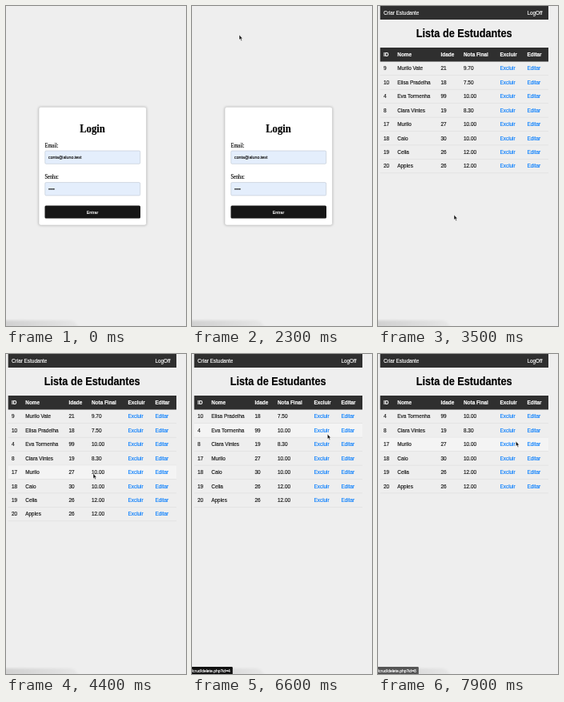
Write an HTML page that moves like this. It is 225 px wide and 400 px high and loops after 8 s.

```html
<!DOCTYPE html>
<html lang="pt-BR">
<head>
<meta charset="utf-8">
<style>
  html, body { margin: 0; width: 100%; height: 100%; overflow: hidden; background: #eee; }
  svg { display: block; width: 100%; height: 100%; }
  text {
    --ink: #111;
    font-family: "Liberation Sans", Arial, sans-serif; font-size: 6.4px;
    fill: var(--ink); stroke: var(--ink); stroke-width: .14;
  }
  .serif { font-family: "Liberation Serif", "Times New Roman", serif; }
  .bold { font-weight: bold; }
  .mid { text-anchor: middle; }
  .h1 { font-size: 12.7px; --ink: #000; }
  .small { font-size: 5.33px; }
  .tiny { font-size: 5px; }
  .white { --ink: #fff; }
  .link { --ink: #007bff; }
</style>
</head>
<body>
<svg viewBox="0 0 225 400" preserveAspectRatio="none">
  <defs>
    <filter id="soft" x="-10%" y="-10%" width="120%" height="120%"><feGaussianBlur stdDeviation="1.5"/></filter>
    <linearGradient id="fade">
      <stop offset="0" stop-color="#cfcfcf"/><stop offset="1" stop-color="#e6e6e6"/>
    </linearGradient>
  </defs>
  <rect width="225" height="400" fill="#eee"/>
  <path d="M-6 393H80Q90 394 91 406H-6Z" fill="url(#fade)" filter="url(#soft)"/>
  <g id="login"></g>
  <g id="list"></g>
  <g id="status"></g>
  <path id="arrow" d="M0 0V6.3L1.4 5.1L2.4 7.5L3.5 7L2.5 4.8H4.3Z" fill="#111" stroke="#fff" stroke-width=".5"/>
  <path id="hand" d="M-.7 .3Q0-.6 .7 .3V2.8L3.6 3.4Q4.2 3.7 4 4.8L3.4 7.4H-.3L-2.3 4.6Q-2.2 3.6-.7 4.6Z" fill="#fff" stroke="#111" stroke-width=".6"/>
</svg>
<script>
const LOOP = 8000, STEP = 100;
const SIGNED_IN = 3500, STATUS_ON = 5700, DELETES = [6500, 7800];
const ROW_TOP = 69.5, ROW_H = 17.45;
const COLS = [7, 24.3, 78.5, 107, 152.5, 186.5];
const $ = id => document.getElementById(id);

// Page content is slightly taller than wide
const text = (x, y, s, cls = '') =>
  `<text class="${cls}" transform="translate(${x} ${y}) scale(1 1.12)">${s}</text>`;
const rect = (x, y, w, h, fill, extra = '') =>
  `<rect x="${x}" y="${y}" width="${w}" height="${h}" fill="${fill}" ${extra}/>`;
const bar = (y, h, fill) => rect(2.7, y, 210.3, h, fill);
const rowText = (cells, y, clsOf) => cells.map((s, i) => text(COLS[i], y, s, clsOf(i))).join('');

const field = (label, y) => text(48.5, y - 4.2, label, 'serif') +
  rect(48.8, y, 118.9, 16.3, '#e4eefc', 'rx="1.4" stroke="#bcc4d0" stroke-width=".6"');
const dot = i => `<circle cx="${54 + i * 1.95}" cy="228.8" r=".85" fill="#111"/>`;

$('login').innerHTML =
  rect(40.5, 126, 135.5, 148.5, '#bbb', 'rx="3" filter="url(#soft)"') +
  rect(41, 126.3, 134.5, 147.7, '#fff', 'rx="2.5" stroke="#ccc" stroke-width=".6"') +
  text(108, 158, 'Login', 'serif bold h1 mid') +
  field('Email:', 181) + text(53, 191.2, 'conta@aluno.test', 'small') +
  field('Senha:', 220.6) + [0, 1, 2, 3].map(dot).join('') +
  rect(48.5, 249.4, 119.5, 16, '#161616', 'rx="1.5"') +
  text(108, 259.5, 'Entrar', 'small white mid');

const students = [
  [9, 'Murilo Vate', 21, '9.70'],
  [10, 'Elisa Pradelha', 18, '7.50'],
  [4, 'Eva Tormenha', 99, '10.00'],
  [8, 'Clara Vintes', 19, '8.30'],
  [17, 'Murilo', 27, '10.00'],
  [18, 'Caio', 30, '10.00'],
  [19, 'Celia', 26, '12.00'],
  [20, 'Apples', 26, '12.00']
];

const listHead =
  bar(0, 17, '#2f2f2f') +
  text(7, 10.8, 'Criar Estudante', 'white') + text(186.4, 10.8, 'LogOff', 'white') +
  text(107.7, 39, 'Lista de Estudantes', 'bold h1 mid') +
  bar(52, 17.5, '#2f2f2f') +
  rowText(['ID', 'Nome', 'Idade', 'Nota Final', 'Excluir', 'Editar'], 62.8, () => 'bold white');

function listHtml(removed, hoverRow) {
  const rows = students.slice(removed).map((cells, i) => {
    const y = ROW_TOP + i * ROW_H;
    return (i === hoverRow ? bar(y, ROW_H, '#f4f4f4') : '') +
      bar(y + ROW_H - .5, .5, '#d6d6d6') +
      rowText([...cells, 'Excluir', 'Editar'], y + 10.8, c => c > 3 ? 'link' : '');
  });
  return listHead + rows.join('');
}

// Pointer moves: start, end, then points passed at an even pace
const moves = [
  [100, 400, [64, 162], [30, 23]],
  [900, 1200, [21, 1], [23.3, 11]],
  [1500, 2300, [23.3, 11], [19, 5], [59, 36]],
  [2400, 2900, [61, 21], [95, 261]],
  [3600, 4500, [94.7, 260], [66, 297], [27, 230], [150, 109]],
  [4500, 5400, [150, 109], [60, 95], [111, 85.5], [160, 81]],
  [5400, 5500, [160, 81], [169, 98]],
  [6500, 6600, [169, 98], [169.3, 100]],
  [6600, 7600, [169.3, 100], [166, 79]],
  [7700, 7900, [166, 79], [172.3, 109]]
];

function pointerAt(t) {
  if (t < 100 || (t > 400 && t < 900)) return null;
  const [from, to, ...pts] = moves.findLast(m => m[0] <= t);
  const u = Math.min(1, (t - from) / (to - from)) * (pts.length - 1);
  const i = Math.min(Math.floor(u), pts.length - 2);
  const [x, y] = pts[i].map((a, k) => a + (pts[i + 1][k] - a) * (u - i));
  return { x, y };
}

const between = (v, a, b) => v >= a && v <= b;
const show = (el, on) => el.setAttribute('visibility', on ? 'visible' : 'hidden');

function draw(t) {
  const p = pointerAt(t), onList = t >= SIGNED_IN;
  const removed = DELETES.filter(d => t >= d).length;
  const row = p ? Math.floor((p.y - ROW_TOP) / ROW_H) : -1;

  show($('login'), !onList);
  $('list').innerHTML = onList ? listHtml(removed, row) : '';
  const fading = removed > 1;
  $('status').innerHTML = t < STATUS_ON ? '' :
    rect(-3, 391, 53.8, 12, fading ? '#555' : '#111', 'rx="1.2"') +
    text(-.3, 397.6, `/crud/delete.php?id=${students[removed + 1][0]}`, 'tiny white');

  const overLink = p && (onList
    ? row >= 0 && between(p.x, 152, 172) && between(p.y - ROW_TOP - row * ROW_H, 4, 12.5)
    : between(p.x, 48, 168) && between(p.y, 249, 266));
  show($('arrow'), p && !overLink);
  show($('hand'), overLink);
  if (p) for (const id of ['arrow', 'hand']) $(id).setAttribute('transform', `translate(${p.x} ${p.y})`);
}

let last = -1;
const start = performance.now();
function tick() {
  const t = Math.floor((performance.now() - start) % LOOP / STEP) * STEP;
  if (t !== last) draw(last = t);
  requestAnimationFrame(tick);
}
tick();
</script>
</body>
</html>
```
